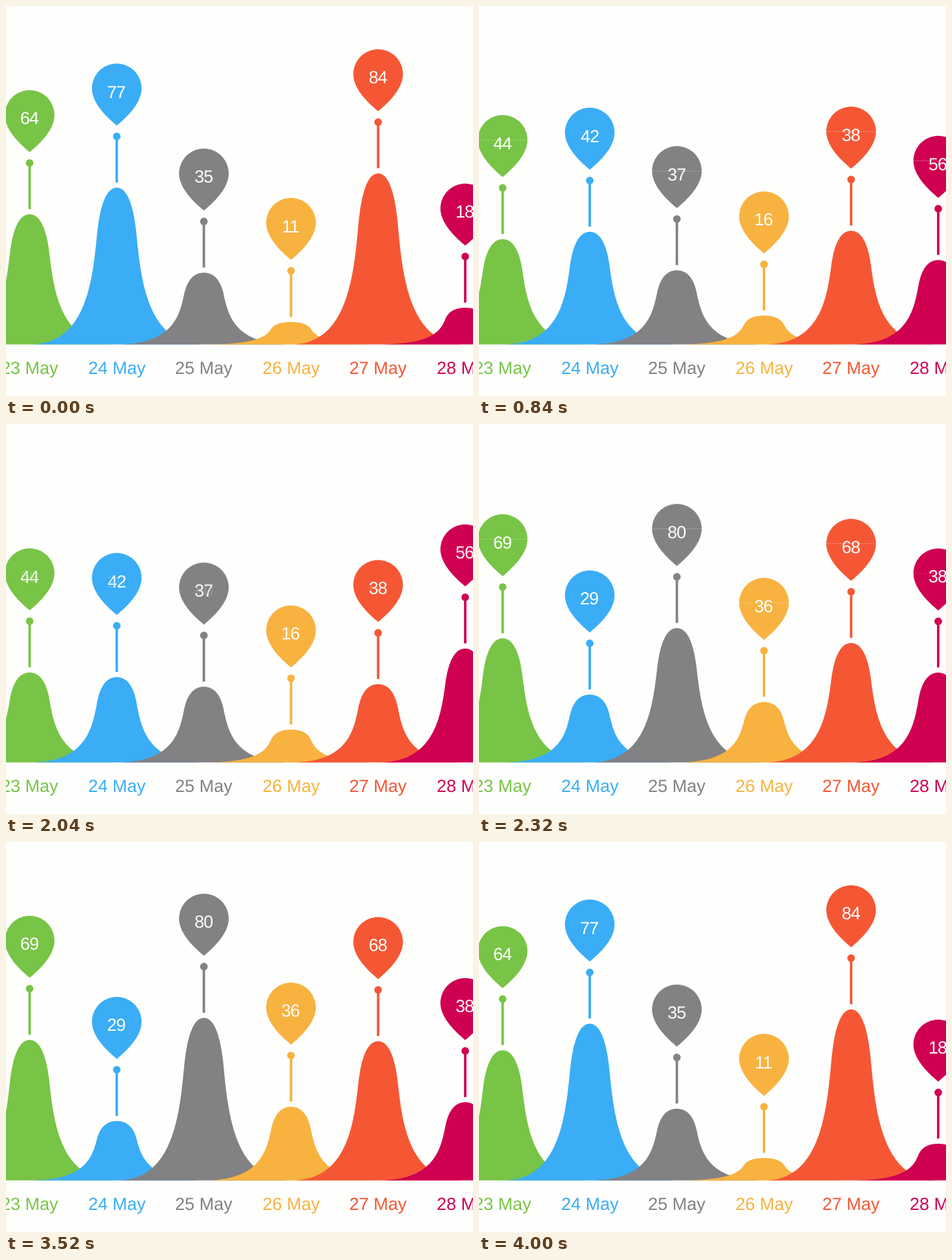
A matplotlib script for the animation above (4640 ms loop, 721 by 601 pixels).

```python
import math

import matplotlib.pyplot as plt
import numpy as np
from matplotlib.animation import FuncAnimation
from matplotlib.patches import Circle, PathPatch, Rectangle
from matplotlib.path import Path
from matplotlib.transforms import Affine2D

W, H, DPI = 721, 601, 64
STEP, LOOP = 40, 4640
BASE = 521.5
UNIT = 3.13           # pixels per counted item
FIRST_X, SPACING = 36.5, 134.5
EASE_MS, FADE_MS = 500, 178
STARTS = (552, 2013, 3515)
PAPER = "#fefefd"
COLORS = ["#78c446", "#3aadf6", "#828183", "#f8b23f", "#f55735", "#cf0052"]
# readings are shown as whole numbers
SETS = [
    (64, 77, 35, 11, 84, 18),
    (44, 42, 37, 16, 38.3, 56),
    (69, 29, 80, 36, 68.3, 38.3),
]

plt.rcParams["font.family"] = "Liberation Sans"
plt.rcParams["text.hinting"] = "none"


def px(size):
    """Pixels to points."""
    return size * 72 / DPI


def mirrored(half):
    """Closed cubic outline from its right half, which starts on the axis."""
    half = np.array(half, float)
    left = half[::-1] * (-1, 1)
    verts = np.vstack([left, half[1:], left[:1]])
    codes = [Path.MOVETO] + [Path.CURVE4] * (len(verts) - 2) + [Path.CLOSEPOLY]
    return Path(verts, codes)


R = 38.3
CAP = Path.arc(180, 360)
TIP = mirrored([(0, 57.2), (21, 40), (R, 20), (R, 0)])
# unit-high bell: rounded top, then a flank running out flat
BELL = mirrored([(0, 1), (16, 1), (26, 0.89), (30.5, 0.70),
                 (37.5, 0.40), (48, 0), (134, 0)])

fig = plt.figure(figsize=(W / DPI, H / DPI), dpi=DPI, facecolor=PAPER)
ax = fig.add_axes([0, 0, 1, 1])
ax.set_xlim(0, W)
ax.set_ylim(H, 0)
ax.axis("off")


class Column:
    def __init__(self, i, color):
        self.x = FIRST_X + i * SPACING
        style = dict(facecolor=color, linewidth=0, snap=False)
        self.hill = ax.add_patch(PathPatch(BELL, zorder=2, **style))
        shapes = [
            PathPatch(CAP.transformed(Affine2D().scale(R)), **style),
            PathPatch(TIP, **style),
            Circle((0, 74), 5.8, **style),
            Rectangle((-1.9, 74), 3.8, 71, **style),
        ]
        self.pin = [ax.add_patch(s) for s in shapes]
        for shape in self.pin:
            shape.set_zorder(3)
        self.count = self.write(0, "", "white")
        self.write(567, f"{23 + i} May", color)

    def write(self, y, text, color):
        return ax.text(self.x, y, text, color=color, fontsize=px(27),
                       ha="center", va="baseline", zorder=4)

    def place(self, top, value):
        hill = Affine2D().scale(1, top - BASE).translate(self.x, BASE)
        self.hill.set_transform(hill + ax.transData)
        pin = Affine2D().translate(self.x, top - 153)
        for shape in self.pin:
            shape.set_transform(pin + ax.transData)
        self.count.set_y(top - 138)
        self.count.set_text(str(int(value)))


columns = [Column(i, c) for i, c in enumerate(COLORS)]


def top_of(value):
    return 521 - round(UNIT * value)


def pose(old, new, k):
    for col, a, b in zip(columns, SETS[old], SETS[new]):
        col.place(top_of(a) + (top_of(b) - top_of(a)) * k, b)


def snapshot(i):
    pose(i, i, 1)
    fig.canvas.draw()
    return np.array(fig.canvas.buffer_rgba())[..., :3]


stills = [snapshot(i) for i in range(len(SETS))]
veil = ax.imshow(stills[0], extent=(0, W, H, 0), aspect="auto",
                 interpolation="nearest", zorder=9, visible=False)


def update(frame):
    now = frame * STEP
    moves = sum(now >= s for s in STARTS)
    t = now - STARTS[moves - 1] if moves else EASE_MS
    old, new = (moves - 1) % len(SETS), moves % len(SETS)
    u = min(1, t / (EASE_MS - 15) if t >= EASE_MS - 15 else t / EASE_MS)
    pose(old, new, (1 - math.cos(math.pi * u)) / 2)
    # the previous picture dissolves while the new one is already moving
    fade = max(0, 1 - t / FADE_MS)
    veil.set_visible(fade > 0)
    veil.set_data(stills[old])
    veil.set_alpha(fade)
    return []


anim = FuncAnimation(fig, update, frames=LOOP // STEP, interval=STEP,
                     init_func=lambda: update(0), repeat=True, repeat_delay=0)
plt.show()
```
